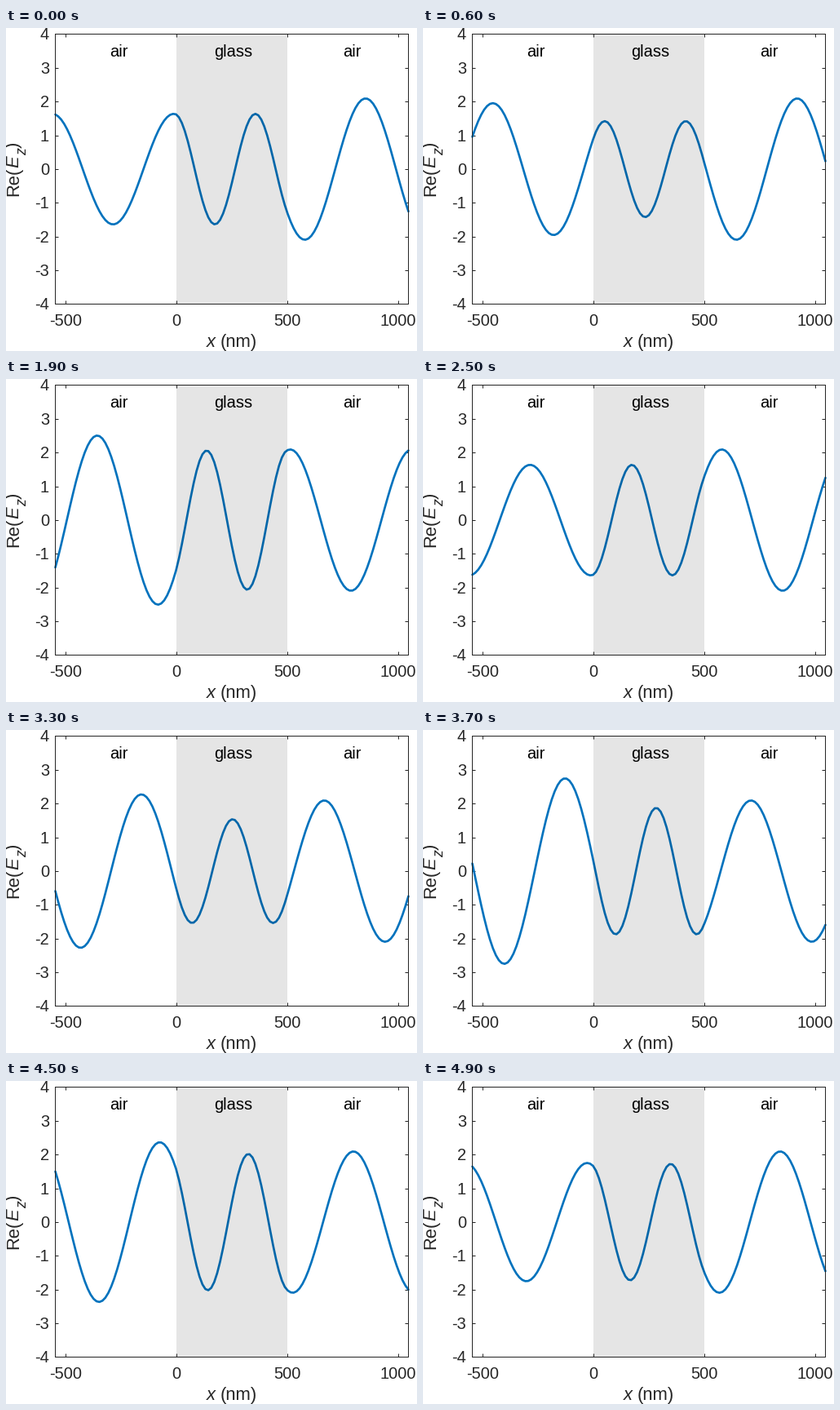
A matplotlib script that plays this animation: 504 by 396 pixels, repeating every 5 s.

```python
import numpy as np
import matplotlib.pyplot as plt
from matplotlib.animation import FuncAnimation

WIDTH, HEIGHT, DPI = 504, 396, 96
FRAMES, INTERVAL = 50, 100
# Just short of the pixel centres, so the frame snaps to these pixels
LEFT, RIGHT, TOP, BOTTOM = 60.49, 493.49, 7.49, 338.49
X_MIN, X_MAX = -546, 1046
INK = "#262626"
TEXT_SIZE, AXIS_SIZE = 15, 16.5

# Plane wave hitting a glass slab at normal incidence
WAVELENGTH, INDEX, THICKNESS = 548, 1.5, 500
INCIDENT = 2.19
GRID_SHIFT = 7.5

plt.rcParams["font.family"] = "Liberation Sans"


def slab_field(x):
    """Complex field before, inside and behind the slab."""
    k = 2 * np.pi / WAVELENGTH
    phi = INDEX * k * THICKNESS
    mean_index = (INDEX + 1 / INDEX) / 2
    sent = INCIDENT / (np.cos(phi) - 1j * mean_index * np.sin(phi))
    u = INDEX * k * (x - THICKNESS)
    inside = sent * (np.cos(u) + 1j / INDEX * np.sin(u))
    back = sent * (np.cos(phi) - 1j / INDEX * np.sin(phi)) - INCIDENT
    before = INCIDENT * np.exp(1j * k * x) + back * np.exp(-1j * k * x)
    behind = sent * np.exp(1j * k * (x - THICKNESS))
    return np.where(x < 0, before, np.where(x < THICKNESS, inside, behind))


fig = plt.figure(figsize=(WIDTH / DPI, HEIGHT / DPI), dpi=DPI, facecolor="white")
ax = fig.add_axes([LEFT / WIDTH, 1 - BOTTOM / HEIGHT,
                   (RIGHT - LEFT) / WIDTH, (BOTTOM - TOP) / HEIGHT])
ax.set(xlim=(X_MIN, X_MAX), ylim=(-4, 4),
       xticks=range(-500, 1001, 500), yticks=range(-4, 5))
ax.tick_params(direction="in", top=True, right=True, length=3.3, width=0.75,
               color=INK, labelbottom=False, labelleft=False)
for spine in ax.spines.values():
    spine.set(color=INK, linewidth=0.75)


def label(x, y, text, size=TEXT_SIZE, color=INK, ha="center", **style):
    """Text with its baseline at a pixel position counted from the top left."""
    fig.text(x / WIDTH, 1 - y / HEIGHT, text, fontsize=size, color=color,
             ha=ha, va="baseline", rotation_mode="anchor", **style)


for value in range(-500, 1001, 500):
    px = LEFT + (value - X_MIN) / (X_MAX - X_MIN) * (RIGHT - LEFT)
    label(px, 365, str(value))
for value in range(-4, 5):
    py = (TOP + BOTTOM) / 2 - value * (BOTTOM - TOP) / 8
    label(53, py + 7, str(value), ha="right")

label(245.5, 391, "x", AXIS_SIZE, ha="left", style="italic")
label(262.6, 391, "(nm)", AXIS_SIZE, ha="left")
for px, py, text, size, style in [(15, 206, "Re(", AXIS_SIZE, "normal"),
                                  (15, 170.6, "E", AXIS_SIZE, "italic"),
                                  (25.5, 156, "z", 0.8 * AXIS_SIZE, "italic"),
                                  (15, 147, ")", AXIS_SIZE, "normal")]:
    label(px, py, text, size, ha="left", style=style, rotation=90)

for px, text in [(138.5, "air"), (278.5, "glass"), (424.5, "air")]:
    label(px, 35, text, color="black")

x = np.linspace(X_MIN, X_MAX, 121)
field = slab_field(x + GRID_SHIFT)
wave, = ax.plot(x, field.real, color="#0072BD", linewidth=2,
                solid_joinstyle="round", solid_capstyle="round", clip_on=False)
ax.axvspan(0, THICKNESS, color="black", alpha=0.1, linewidth=0, zorder=3,
           snap=False)


def update(frame):
    turn = np.exp(-2j * np.pi * (frame + 1) / FRAMES)
    wave.set_ydata((field * turn).real)
    return wave,


anim = FuncAnimation(fig, update, frames=FRAMES, interval=INTERVAL,
                     repeat=True, repeat_delay=0)
plt.show()
```
